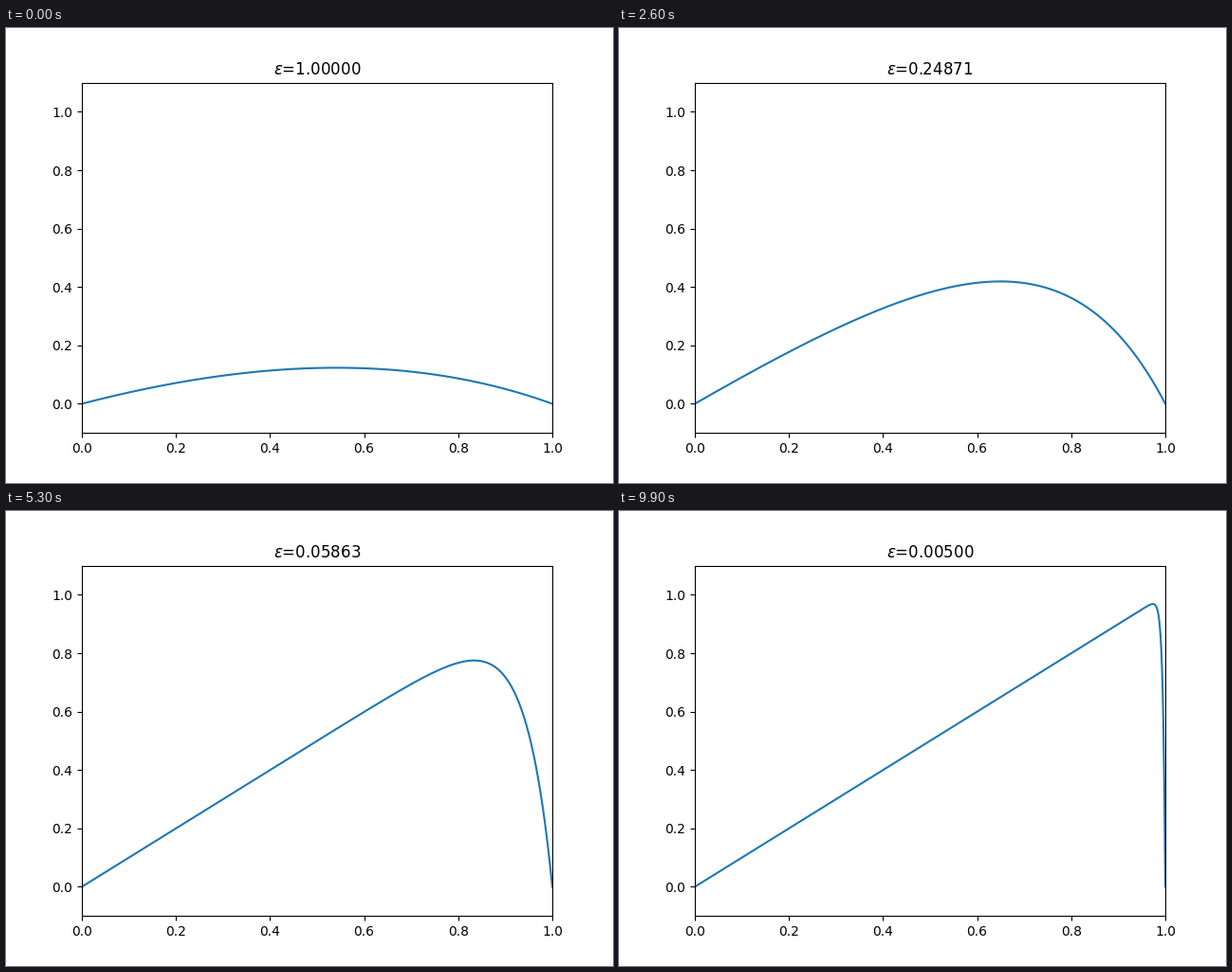
A matplotlib script that plays this animation: 640 by 480 pixels, repeating every 10 s.

```python
import numpy as np
import matplotlib.pyplot as plt
from matplotlib.animation import FuncAnimation

FRAMES = 100
EPS_END = 0.005

x = np.linspace(0, 1, 1001)


def solution(eps):
    """Boundary-layer solution of -eps u'' + u' = 1 with u(0) = u(1) = 0."""
    tail = np.exp(-1 / eps)
    return x - (np.exp((x - 1) / eps) - tail) / (1 - tail)


fig, ax = plt.subplots(figsize=(6.4, 4.8), dpi=100)
ax.set_xlim(0, 1)
ax.set_ylim(-0.1, 1.1)
line, = ax.plot([], [], color="C0", lw=1.5)
title = ax.set_title("")


def update(i):
    eps = EPS_END ** (i / (FRAMES - 1))
    line.set_data(x, solution(eps))
    title.set_text(rf"$\varepsilon$={eps:.5f}")
    return line, title


anim = FuncAnimation(fig, update, frames=FRAMES, interval=100,
                     init_func=lambda: update(0), repeat=True, repeat_delay=0)
plt.show()
```
